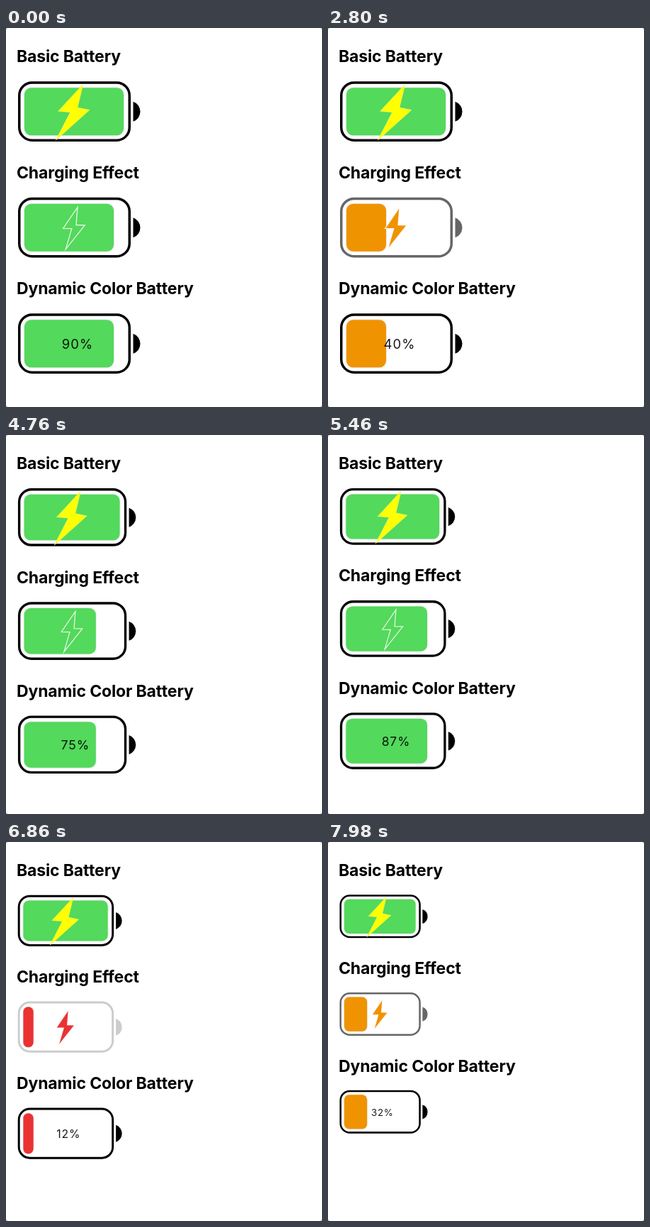
These frames come from a looping animation (446 by 534 pixels, 8000 ms). An HTML page:

```html
<!DOCTYPE html>
<html lang="en">
<head>
<meta charset="utf-8">
<title>Battery views</title>
<style>
  html, body { margin: 0; width: 100%; height: 100%; overflow: hidden; background: #888; }
  svg { display: block; width: 446px; height: 534px; }
  text { font-family: Inter, Roboto, sans-serif; }
  .title { font-size: 23px; font-weight: 700; letter-spacing: -.15px; }
  .percent { font-size: 18.5px; letter-spacing: 1px; text-anchor: middle; fill-opacity: .9; }
</style>
</head>
<body>
<svg id="stage" viewBox="0 0 446 534">
  <rect width="446" height="534" rx="3" fill="#fff"/>
</svg>
<script>
const LOOP = 8000, STEP = 70, MS_PER_PERCENT = 56;
const ORIGIN = { x: 15, y: 72 }, FRAME_HEIGHT = 92, GAP = 71.5, FULL_WIDTH = 140;
const GREEN = '#53d95b', ORANGE = '#f09300', RED = '#ea3232';

// Time and scale pairs for the resizing of all three batteries.
const SCALE_KEYS = [
  [0, 1], [2900, 1], [3710, .993], [4550, .9705], [5390, .9446],
  [6160, .907], [6860, .852], [7070, .832], [7980, .7195]
];

const stage = document.getElementById('stage');

function add(parent, name, attributes = {}) {
  const node = document.createElementNS('http://www.w3.org/2000/svg', name);
  set(node, attributes);
  return parent.appendChild(node);
}

function set(node, attributes) {
  for (const key in attributes) node.setAttribute(key, attributes[key]);
}

function makeBattery(label) {
  const title = add(stage, 'text', { class: 'title', x: ORIGIN.x });
  title.textContent = label;
  const group = add(stage, 'g');
  const shell = add(group, 'rect', {
    x: 3.75, y: 4.95, width: 155.5, height: 81.2, rx: 18,
    fill: 'none', 'stroke-width': 3.5
  });
  const cap = add(group, 'path', { d: 'M164.5 31.8A14.8 14.8 0 0 1 164.5 59.8Z' });
  const fill = add(group, 'rect', {
    x: 11, y: 12.2, height: 67,
    stroke: '#000', 'stroke-opacity': .08, 'stroke-width': 2, 'paint-order': 'stroke'
  });
  return { title, group, shell, cap, fill };
}

const basic = makeBattery('Basic Battery');
add(basic.group, 'polygon', {
  points: '94,7 58.5,45.3 75.5,46.8 55,86.5 103,43.5 86,40',
  fill: '#ff0', stroke: '#fff', 'stroke-opacity': .3
});

const charging = makeBattery('Charging Effect');
const bolt = add(charging.group, 'polygon', {
  points: '86,17 65.6,46.9 77.8,47.1 69.2,76.3 96.2,42.3 84,42',
  stroke: '#fff', 'stroke-opacity': .85, 'stroke-width': 1.3, 'stroke-miterlimit': 10
});

const dynamic = makeBattery('Dynamic Color Battery');
const percent = add(dynamic.group, 'text', { class: 'percent', x: 86, y: 53 });

const batteries = [basic, charging, dynamic];

function scaleAt(time) {
  const next = SCALE_KEYS.findIndex(([at]) => at > time);
  if (next < 0) return SCALE_KEYS[SCALE_KEYS.length - 1][1];
  const [t0, s0] = SCALE_KEYS[next - 1], [t1, s1] = SCALE_KEYS[next];
  return s0 + (s1 - s0) * (time - t0) / (t1 - t0);
}

function levelAt(time) {
  return Math.floor(90.25 + time / MS_PER_PERCENT) % 100;
}

function paint(battery, level, color, caseColor) {
  const width = FULL_WIDTH * level / 100;
  set(battery.fill, {
    width, rx: Math.min(9.5, width / 2), fill: color,
    visibility: level ? 'visible' : 'hidden'
  });
  set(battery.shell, { stroke: caseColor });
  set(battery.cap, { fill: caseColor });
}

function render(elapsed) {
  const time = Math.floor((elapsed % LOOP) / STEP) * STEP;
  const scale = scaleAt(time), level = levelAt(time);
  const [color, caseColor] =
    level <= 20 ? [RED, '#ccc'] : level <= 50 ? [ORANGE, '#666'] : [GREEN, '#000'];

  batteries.forEach((battery, index) => {
    const shift = index * (FRAME_HEIGHT * scale + GAP);
    set(battery.title, { y: 48.4 + shift });
    set(battery.group, {
      transform: `translate(${ORIGIN.x} ${ORIGIN.y + shift}) scale(${scale})`
    });
  });

  paint(basic, 100, GREEN, '#000');
  paint(charging, level, color, caseColor);
  paint(dynamic, level, color, '#000');
  set(bolt, { fill: color });
  percent.textContent = level + '%';
}

const start = performance.now();
function tick() {
  render(performance.now() - start);
  requestAnimationFrame(tick);
}
tick();
</script>
</body>
</html>
```
